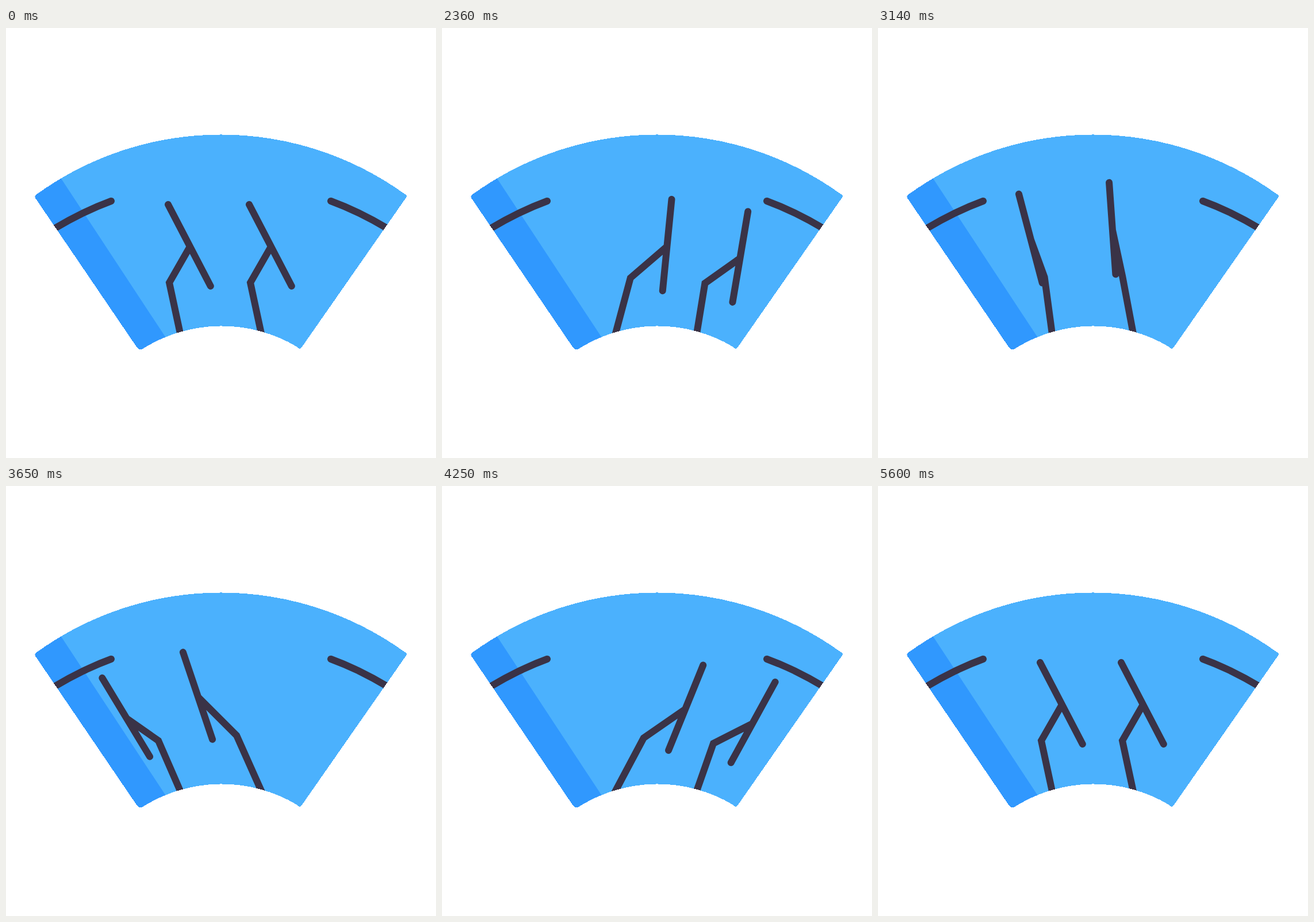
An HTML page for the animation above (5630 ms loop, 748 by 748 pixels).

```html
<!DOCTYPE html>
<html>
<head>
<meta charset="utf-8">
<style>
  html, body { margin: 0; width: 100%; height: 100%; overflow: hidden; background: #fff; }
  svg { display: block; width: 100%; height: 100%; }
  .lines { fill: none; stroke: #3a3347; stroke-width: 12; stroke-linecap: round; stroke-linejoin: miter; }
  .surround { fill: #fff; fill-rule: evenodd; shape-rendering: crispEdges; }
</style>
</head>
<body>
<svg viewBox="0 0 748 748">
  <path fill="#4bb1fd" d="M0 0H748V748H0Z"/>
  <path fill="#3098fe" d="M0 200H55.2L303.3 577H0Z"/>
  <g class="lines">
    <path d="M183 301Q134 319 84 349M565 301Q614 319 664 349"/>
    <path id="left"/>
    <path id="right"/>
  </g>
  <!-- White surround with the windscreen cut out -->
  <path class="surround" d="M0 0H748V748H0ZM56 287.5Q48 292 51.5 296.5L228 556Q232 561 238 558A257 257 0 0 1 507 555Q511 560 514 556L696 295Q699 292 693 288.5A546 546 0 0 0 56 287.5Z"/>
</svg>
<script>
const LOOP = 5630, BASE_Y = 529, HALF_BLADE = 80;

// Pose: elbow angle, elbow distance, blade centre angle, centre distance, blade tilt.
// Angles are in degrees clockwise from straight up, seen from the pivot.
const rest = [-12.1, 88, 6.2, 151.9, -27.5];
const wipers = [
  { id: 'left', x: 302.5, poses: { rest, right: [31, 103.2, 44.8, 189.7, 25.2], left: [-28.7, 92.9, -44.2, 154.6, -36.5] } },
  { id: 'right', x: 443.5, poses: { rest, right: [21.9, 85, 43.9, 150.5, 31.5], left: [-28.4, 105.8, -41.2, 202, -23.4] } }
];

// Each move: start, end, from, to, x of the second easing handle.
const moves = [
  [2000, 2615, 'rest', 'right', 2 / 3],
  [2615, 3492, 'right', 'left', 2 / 3],
  [3492, 4370, 'left', 'right', 2 / 3],
  [4370, 5600, 'right', 'rest', 0.2]
];

// Cubic bezier easing with handles (1/3, 0) and (x2, 1).
function ease(x, x2) {
  let lo = 0, hi = 1;
  for (let i = 0; i < 24; i++) {
    const s = (lo + hi) / 2, r = 1 - s;
    if (s * r * r + 3 * x2 * s * s * r + s ** 3 < x) lo = s; else hi = s;
  }
  return lo * lo * (3 - 2 * lo);
}

function polar([x, y], degrees, distance) {
  const a = degrees * Math.PI / 180;
  return [x + distance * Math.sin(a), y - distance * Math.cos(a)];
}

const polyline = points => 'M' + points.map(p => p.map(v => v.toFixed(2)).join(' ')).join('L');

function drawWiper({ id, x, poses }, from, to, p) {
  const [elbowAngle, elbowDist, midAngle, midDist, tilt] =
    poses[from].map((v, i) => v + (poses[to][i] - v) * p);
  const base = [x, BASE_Y];
  const mid = polar(base, midAngle, midDist);
  const arm = [polar(base, elbowAngle, -8), polar(base, elbowAngle, elbowDist), polar(mid, tilt, -2.5)];
  const blade = [polar(mid, tilt, HALF_BLADE), polar(mid, tilt, -HALF_BLADE)];
  document.getElementById(id).setAttribute('d', polyline(arm) + polyline(blade));
}

function frame() {
  const t = performance.now() % LOOP;
  const move = moves.find(([start, end]) => t >= start && t < end);
  const [start, end, from, to, x2] = move || [0, 1, 'rest', 'rest', 1];
  const p = move ? ease((t - start) / (end - start), x2) : 0;
  wipers.forEach(w => drawWiper(w, from, to, p));
  requestAnimationFrame(frame);
}
frame();
</script>
</body>
</html>
```
